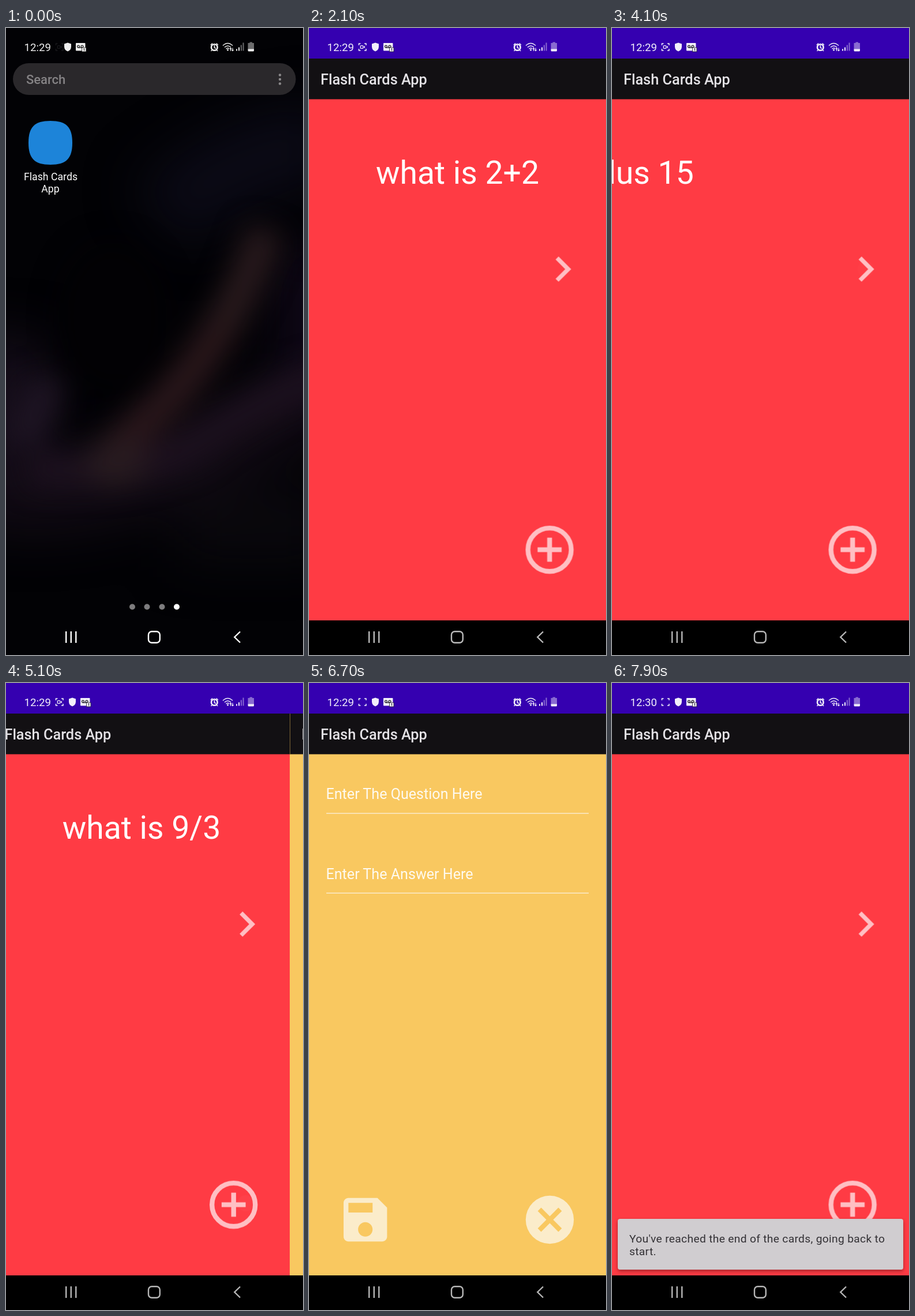
These frames come from a looping animation (515x1087 px, 8 s). An HTML page:

```html
<!DOCTYPE html>
<html lang="en">
<head>
<meta charset="utf-8">
<title>Flash Cards App</title>
<style>
html, body { margin: 0; width: 100%; height: 100%; overflow: hidden; background: #000; }
svg { display: block; width: 515px; height: 1087px; }
text { font-family: Roboto, Inter, sans-serif; fill: #fff; }
.mid { text-anchor: middle; }
.label { font-size: 17.7px; }
.title { font-size: 25.3px; font-weight: 500; fill: #e4e2e6; }
.card { font-size: 55.3px; }
.hint { font-size: 25.1px; fill: #fefaf0; }
.note { font-size: 19.25px; letter-spacing: .3px; fill: #333135; }
.line { fill: none; stroke: #fff; }
.pink { fill: #ffbfc3; }
.cream { fill: #fbecca; }

/* Every part shares the 8 s clock: 1% = 80 ms. */
.a { animation: 8s cubic-bezier(.37, 0, .63, 1) infinite both; }

.home { animation-name: home; }
@keyframes home { 0%, 18.7% { opacity: 1 } 21%, 100% { opacity: 0 } }

.icon { fill: #1d84d9; animation-name: press; }
@keyframes press { 0%, 14.9% { fill: #1d84d9 } 15%, 100% { fill: #1971b9 } }

.win { fill: #121013; stroke: #1e1c20; animation-name: win; }
@keyframes win {
  0%, 18.7% { x: 39px; y: 161px; width: 76px; height: 76px; rx: 30px; opacity: 0 }
  18.75% { x: 39px; y: 161px; width: 76px; height: 76px; rx: 30px; opacity: 1; animation-timing-function: cubic-bezier(.2, .6, .3, 1) }
  23.75% { x: 1px; y: 2.5px; width: 505px; height: 1065.5px; rx: 45px; opacity: 1 }
  25.5%, 100% { x: 0; y: 0; width: 515px; height: 1087px; rx: 45px; opacity: 1 }
}
.splash { fill: #2095f2; animation-name: splash; }
@keyframes splash {
  0%, 18.7% { transform: translate(77px, 199px) scale(.76); opacity: 0 }
  18.75% { transform: translate(77px, 199px) scale(.76); opacity: 1; animation-timing-function: cubic-bezier(.2, .6, .3, 1) }
  23.75% { transform: translate(253px, 535.8px) scale(1.155); opacity: 1 }
  25.5%, 100% { transform: translate(257.5px, 543.5px) scale(1.18); opacity: 1 }
}

.app { animation-name: app; }
@keyframes app { 0%, 24.4% { opacity: 0 } 26.2%, 100% { opacity: 1 } }

.main { animation-name: main; }
@keyframes main {
  0%, 62.92% { transform: none }
  69.15%, 84.44% { transform: translate(-515px, 0) }
  84.45% { transform: translate(0, -20.6px); animation-timing-function: cubic-bezier(.4, 0, .2, 1) }
  89.76%, 100% { transform: none }
}
.form { animation-name: form; }
@keyframes form {
  0%, 62.92% { transform: translate(515px, 0); opacity: 1 }
  69.15%, 84.45% { transform: none; opacity: 1 }
  85.5%, 100% { transform: translate(0, 5px); opacity: 0 }
}

.c1 { animation-name: c1; }
@keyframes c1 { 0%, 31.25% { transform: none } 37.5%, 100% { transform: translate(-515px, 0) } }
.c2 { animation-name: c2; }
@keyframes c2 {
  0%, 40% { transform: translate(515px, 0) }
  46.25%, 47.9% { transform: none }
  53.5%, 100% { transform: translate(-515px, 0) }
}
.c3 { animation-name: c3; }
@keyframes c3 {
  0%, 53.5% { transform: translate(515px, 0) }
  59%, 92.5% { transform: none }
  98.5%, 100% { transform: translate(-515px, 0) }
}

.tap { fill: #fff; opacity: 0; }
.tap-next { animation-name: tapNext; }
@keyframes tapNext {
  0%, 29.5%, 33.5%, 48%, 51.5%, 92%, 95.5%, 100% { opacity: 0 }
  30.5%, 32%, 49%, 50%, 93%, 94% { opacity: .22 }
}
.tap-add { animation-name: tapAdd; }
@keyframes tapAdd { 0%, 59.5%, 64.3%, 100% { opacity: 0 } 60.5%, 62% { opacity: .22 } }

.bar { transform-origin: 257.5px 973px; animation-name: bar; }
@keyframes bar {
  0%, 94% { opacity: 0; transform: scale(.8) }
  96%, 100% { opacity: 1; transform: none }
}

.dim { animation-name: dim; }
@keyframes dim { 0%, 25% { opacity: 1 } 26.5%, 100% { opacity: .72 } }
.rec { animation-name: rec; }
@keyframes rec { 0%, .9% { opacity: .1 } 2.4%, 100% { opacity: 1 } }
.shift { animation-name: shift; }
@keyframes shift { 0%, .9% { transform: translate(-8px, 0) } 1.6%, 100% { transform: none } }
.blink { animation: blink 1s step-end infinite; }
@keyframes blink { 0% { opacity: 1 } 48% { opacity: 0 } }
.before { animation-name: before; animation-timing-function: step-end; }
@keyframes before { 0% { opacity: 1 } 93.5%, 100% { opacity: 0 } }
.after { animation-name: after; animation-timing-function: step-end; }
@keyframes after { 0% { opacity: 0 } 93.5%, 100% { opacity: 1 } }
</style>
</head>
<body>
<svg viewBox="0 0 515 1087">
  <defs>
    <filter id="soft" filterUnits="userSpaceOnUse" x="-150" y="-100" width="815" height="1287" color-interpolation-filters="sRGB"><feGaussianBlur stdDeviation="24"/></filter>
    <filter id="haze" filterUnits="userSpaceOnUse" x="-200" y="-100" width="915" height="1287" color-interpolation-filters="sRGB"><feGaussianBlur stdDeviation="45"/></filter>
    <filter id="shade" x="-5%" y="-10%" width="110%" height="130%"><feDropShadow dx="0" dy="3" stdDeviation="3" flood-opacity=".35"/></filter>
    <path id="tile" d="M0-50C36-50 50-36 50 0S36 50 0 50-50 36-50 0-36-50 0-50z"/>
    <g id="header">
      <rect y="53" width="515" height="71" fill="#121013"/>
      <text class="title" x="20" y="98">Flash Cards App</text>
    </g>
  </defs>

  <!-- Wallpaper -->
  <rect width="515" height="1087" fill="#020205"/>
  <g filter="url(#haze)" fill="none">
    <path d="M270 330Q400 210 560 200" stroke="#0b0a16" stroke-width="140"/>
    <path d="M560 380V680" stroke="#100818" stroke-width="170"/>
    <path d="M-40 540V830" stroke="#150d1a" stroke-width="220"/>
    <path d="M-40 800Q190 840 530 640" stroke="#120b15" stroke-width="130"/>
    <path d="M300 860H560" stroke="#0a080d" stroke-width="120"/>
  </g>
  <g filter="url(#soft)" fill="none">
    <path d="M75 610L25 720" stroke="#1f1524" stroke-width="60"/>
    <path d="M40 765Q250 780 340 715T560 600" stroke="#1d111f" stroke-width="55"/>
    <path d="M450 350Q420 440 370 525" stroke="#291a1d" stroke-width="62"/>
    <path d="M375 515Q320 610 245 680T165 765" stroke="#2a171b" stroke-width="62"/>
    <ellipse cx="190" cy="755" rx="55" ry="40" fill="#281b20"/>
    <ellipse cx="185" cy="500" rx="95" ry="130" fill="#020104"/>
  </g>

  <!-- Home screen -->
  <g class="a home">
    <rect x="12" y="61" width="490.5" height="55" rx="27.5" fill="#2a282b"/>
    <text x="35" y="97" font-size="22" font-weight="500" style="fill:#858385">Search</text>
    <g fill="#8b898b"><circle cx="475" cy="81.5" r="2.2"/><circle cx="475" cy="89" r="2.2"/><circle cx="475" cy="96.5" r="2.2"/></g>
    <use href="#tile" class="a icon" transform="translate(77 199) scale(.76)"/>
    <text class="label mid" x="77.5" y="264">Flash Cards</text>
    <text class="label mid" x="77" y="285">App</text>
    <g fill="#7d7c7e">
      <circle cx="219" cy="1003.5" r="5"/><circle cx="244.5" cy="1003.5" r="5"/><circle cx="270.5" cy="1003.5" r="5"/>
      <circle cx="296" cy="1003.5" r="5" fill="#fff"/>
    </g>
  </g>

  <!-- Launch window -->
  <rect class="a win"/>
  <use href="#tile" class="a splash"/>

  <!-- App -->
  <g class="a app">
    <rect width="515" height="1087"/>
    <rect width="515" height="53.5" fill="#3500b0"/>

    <g class="a main">
      <use href="#header"/>
      <rect y="123.5" width="515" height="903.5" fill="#ff3b44"/>
      <text class="a card mid c1" x="257.5" y="270">what is 2+2</text>
      <text class="a card mid c2" x="257.5" y="270">what is 12 plus 15</text>
      <text class="a card mid c3" x="257.5" y="270">what is 9/3</text>
      <path class="pink" transform="translate(396.2 374.2) scale(3.65)" d="M10 6L8.59 7.41 13.17 12l-4.58 4.59L10 18l6-6z"/>
      <g transform="translate(417.2 904.5) scale(4.17)" fill="none" stroke="#ffbfc3" stroke-width="2">
        <circle r="9"/><path d="M-5 0H5M0-5V5"/>
      </g>
      <circle class="a tap tap-next" cx="440" cy="418" r="14"/>
      <circle class="a tap tap-add" cx="438" cy="902" r="14"/>
      <g class="a bar">
        <rect x="10" y="929" width="495" height="88" rx="4" fill="#d0cdd0" filter="url(#shade)"/>
        <text class="note" x="30" y="969.5">You've reached the end of the cards, going back to</text>
        <text class="note" x="30" y="992">start.</text>
      </g>
    </g>

    <g class="a form">
      <use href="#header"/>
      <rect y="123.5" width="515" height="903.5" fill="#f9c860"/>
      <text class="hint" x="29.5" y="201">Enter The Question Here</text>
      <text class="hint" x="29.5" y="339.5">Enter The Answer Here</text>
      <path d="M30 226H485M30 364.3H485" stroke="#fbeccb" stroke-width="1.6"/>
      <path class="cream" transform="translate(47.4 880.2) scale(4.19)" d="M17 3H5c-1.11 0-2 .9-2 2v14c0 1.1.89 2 2 2h14c1.1 0 2-.9 2-2V7l-4-4zm-5 16c-1.66 0-3-1.34-3-3s1.34-3 3-3 3 1.34 3 3-1.34 3-3 3zm3-10H5V5h10v4z"/>
      <g transform="translate(417.5 930.5) scale(4.17)">
        <circle class="cream" r="10"/>
        <path d="M-4.3-4.3L4.3 4.3M4.3-4.3L-4.3 4.3" stroke="#f9c860" stroke-width="2"/>
      </g>
    </g>
  </g>

  <!-- Status bar -->
  <g opacity=".94" fill="#fff">
    <g font-size="18.7">
      <text class="a before" x="31.5" y="39.7">12:29</text>
      <text class="a after" x="31.5" y="39.7">12:30</text>
    </g>
    <g class="a rec">
      <path class="line" stroke-width="1.5" d="M86.5 30V27H89.5M96 27H99V30M99 36V39H96M89.5 39H86.5V36"/>
      <g class="blink">
        <rect class="line" x="89.3" y="30.6" width="4.6" height="4.8" rx="1" stroke-width="1.3"/>
        <path d="M94.5 33L97 30.7V35.3z"/>
      </g>
    </g>
    <g class="a shift">
      <path d="M115 25.5L121 27.5V33Q120.5 38.5 115 40.5Q109.5 38.5 109 33V27.5z"/>
      <rect x="129" y="26" width="16.5" height="13.5" rx="1"/>
      <g fill="none" stroke="#222" stroke-width="1.3"><circle cx="133.5" cy="32" r="1.9"/><circle cx="140" cy="32" r="1.9"/><path d="M133.5 34H140"/></g>
      <rect x="139.5" y="34" width="7.5" height="7" stroke="#222" stroke-width=".8"/>
      <path d="M142.5 36.3L143.6 35.6V39.5" stroke="#222" fill="none"/>
    </g>
    <g class="line">
      <circle cx="361.3" cy="33.5" r="5.3" stroke-width="2.6"/>
      <path stroke-width="1.6" d="M361.3 30V34L364 35.5M354.8 29.5L358 26.5M367.8 29.5L364.6 26.5M357.3 38L355.5 40M365.3 38L367 40"/>
      <path stroke-width="1.5" d="M376 30.5Q384.5 22.5 393 30.5M379 33.5Q384.5 28.5 390 33.5M381.5 36.3Q384.5 33.5 387 36"/>
      <path stroke-width="1.2" d="M389.5 40V35M388 36.5L389.5 34.8L391 36.5M393 34.5V39.5M391.5 38L393 39.7L394.5 38"/>
      <path stroke-width="2" d="M400 39.5V36.5M404 39.5V33.5"/>
      <path stroke-width="2" stroke-opacity=".45" d="M407.8 39.5V29.5M411.5 39.5V25.5"/>
    </g>
    <circle cx="384.5" cy="38" r="1.5"/>
    <path fill-opacity=".45" d="M422.5 24.5H427V26H430V37H419.5V26H422.5z"/>
    <path d="M419.5 36.5H430V39Q430 40.5 428.5 40.5H421Q419.5 40.5 419.5 39z"/>
  </g>

  <!-- Navigation bar -->
  <g class="a dim line" stroke-width="2.4">
    <path d="M104.2 1046V1066M112.8 1046V1066M121.3 1046V1066"/>
    <rect x="247" y="1046.2" width="19.8" height="19.6" rx="5.8"/>
    <path d="M406 1046.5L396.3 1056L406 1065.5"/>
  </g>
</svg>
</body>
</html>
```
